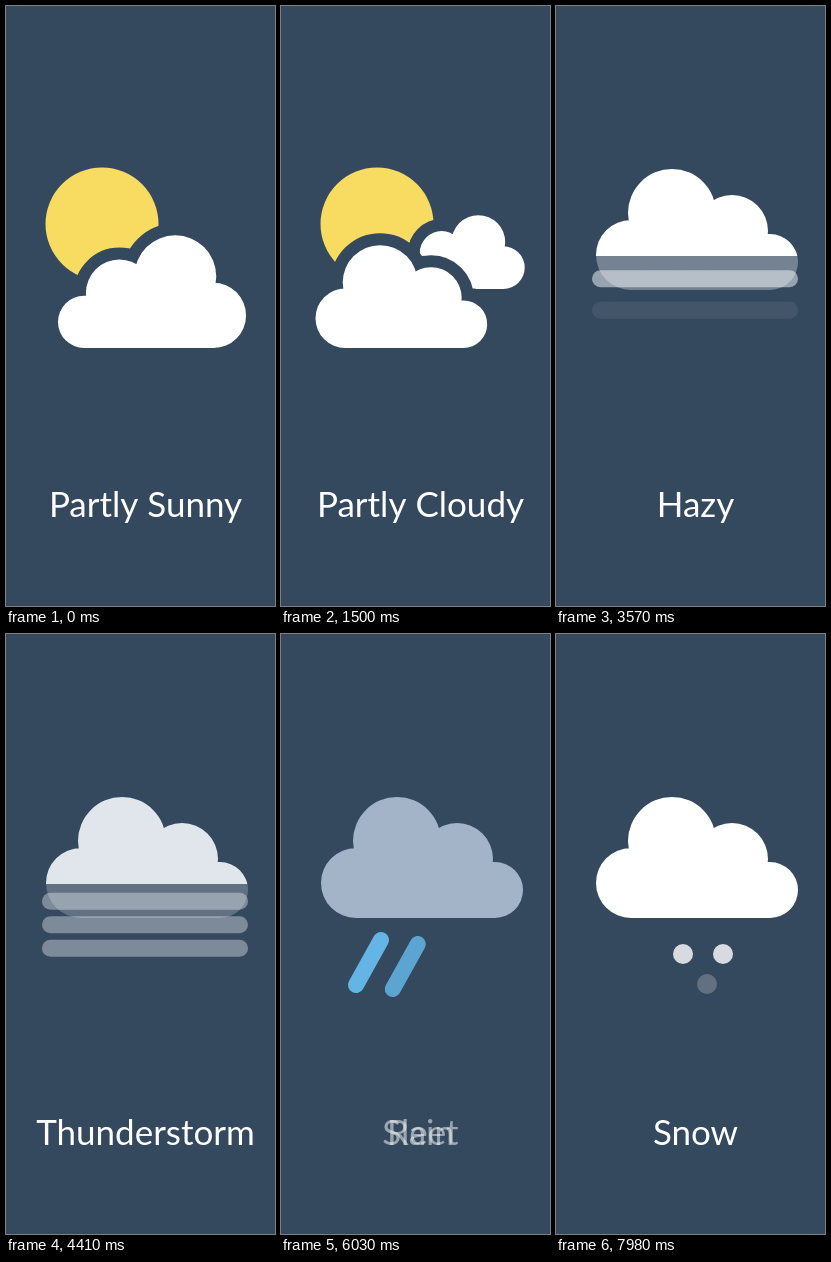
Recreate the animation shown at these times as an HTML page with a canvas. Size 269 by 600 pixels, loop 8000 ms.

```html
<!DOCTYPE html>
<html lang="en">
<head>
<meta charset="utf-8">
<title>Weather</title>
<style>
html, body { margin: 0; width: 100%; height: 100%; overflow: hidden; background: #34495e; }
canvas { display: block; }
</style>
</head>
<body>
<canvas id="stage" width="269" height="600"></canvas>
<script>
const ctx = document.getElementById('stage').getContext('2d');
const LOOP = 8000, BG = '#34495e', SUN = '#f8db61', RAIN = '#64b5e6', ICE = '#bfe3f7';
const MID = 139.5, BASE = 510.5, FADE = 200;

const linear = p => p;
const inOut = p => p < .5 ? 4 * p ** 3 : 1 - (2 - 2 * p) ** 3 / 2;
const outBack = p => 1 + 2.7 * (p - 1) ** 3 + 1.7 * (p - 1) ** 2;
const ramp = (t, a, b, ease = linear) => ease(Math.min(1, Math.max(0, (t - a) / (b - a))));
const mix = (a, b, p) => a.map((v, i) => v + (b[i] - v) * p);

// Runs a value through moves of the form [begin, end, ease, value].
const track = (t, value, moves) =>
  moves.reduce((v, [a, b, ease, to]) => mix(v, to, ramp(t, a, b, ease)), value);

// Lobes of a 202 x 121 cloud: x, y above the base, radius.
const LOBES = [[35, 35, 35], [76, 77, 44], [136, 59, 36], [174, 28, 28]];

function cloud([left, base, size], color, flip, alpha = 1) {
  ctx.save();
  ctx.translate(flip ? left + 202 * size : left, base);
  ctx.scale(flip ? -size : size, size);
  ctx.beginPath();
  for (const [x, y, r] of LOBES) {
    ctx.moveTo(x + r, -y);
    ctx.arc(x, -y, r, 0, 7);
  }
  ctx.rect(35, -56, 139, 56);
  ctx.strokeStyle = BG;
  ctx.lineWidth = 24 / size;
  ctx.stroke();
  ctx.globalAlpha = alpha;
  ctx.fillStyle = color;
  ctx.fill();
  ctx.restore();
}

function dot(x, y, r, color, alpha = 1) {
  ctx.globalAlpha = alpha;
  ctx.fillStyle = color;
  ctx.beginPath();
  ctx.arc(x, y, r, 0, 7);
  ctx.fill();
}

function capsule(x1, y1, x2, y2, width, color, alpha) {
  ctx.globalAlpha = alpha;
  ctx.strokeStyle = color;
  ctx.lineWidth = width;
  ctx.lineCap = 'round';
  ctx.beginPath();
  ctx.moveTo(x1, y1);
  ctx.lineTo(x2, y2);
  ctx.stroke();
}

function clipRows(top, bottom, paint) {
  ctx.save();
  ctx.beginPath();
  ctx.rect(0, top, 269, bottom - top);
  ctx.clip();
  paint();
  ctx.restore();
}

function sky(t) {
  const sink = ramp(t, 2280, 2850, inOut);
  const back = track(t, [52, 342, .931], [
    [630, 1170, outBack, [120.5, 283, .61]],
    [1500, 1830, inOut, [89, 274, .768]],
    [2490, 2850, outBack, [92, 263, .88]],
    [3120, 3420, inOut, [80, 284, .6]]]);
  const front = track(t, [-200, 342, .85], [
    [690, 1230, outBack, [34.5, 342, .85]],
    [1500, 1830, inOut, [35, 342, .911]],
    [2490, 2850, outBack, [34, 342, .96]],
    [3120, 3420, inOut, [40, 284, 1]]]);

  if (t < 2850) {
    dot(96 + 55 * sink, 218 + 50 * sink, 56.5, SUN);
    ctx.globalAlpha = 1;
    if (sink) cloud([back[0] - 14 * Math.min(1, sink * 5), back[1] - 2, back[2]], BG, true);
  }
  ctx.globalAlpha = 1;
  if (t < 3420) cloud(back, '#fff', true);

  const gray = ramp(t, 4200, 4830) - ramp(t, 7440, 7900);
  const color = `rgb(${mix([255, 255, 255], [164, 180, 200], gray)})`;
  const low = 1 - ramp(t, 3420, 3640) + ramp(t, 4350, 4590);
  if (low >= 1) cloud(front, color);
  else {
    clipRows(0, 250, () => cloud(front, color));
    clipRows(250, 300, () => cloud(front, color, false, low));
  }
}

function haze(t) {
  const out = ramp(t, 4200, 4560);
  for (let i = 0; i < 3; i++) {
    const p = ramp(t, 3450 + i * 105, 3660 + i * 105);
    const y = 266 + 23.5 * i + 16 * (1 - p) + 2 * out;
    capsule(44.5, y, 233.5, y, 17, '#f4f7fb', .9 * p * (1 - out));
  }
}

function bolt(t) {
  const p = ramp(t, 4560, 4830, inOut), out = ramp(t, 5070, 5270);
  ctx.globalAlpha = p * (1 - out);
  ctx.fillStyle = SUN;
  clipRows(296, 296 + 90 * p, () => {
    ctx.beginPath();
    [[134, 297], [164, 297], [150, 327], [170, 327], [124, 382], [136, 343], [115, 343]]
      .forEach(([x, y]) => ctx.lineTo(x, y));
    ctx.fill();
  });
}

// One slanted streak that grows from its top and slides away.
function streak(x, length, grow, fall, paint) {
  if (!grow || fall >= 1) return;
  ctx.save();
  ctx.translate(x - 16 * fall, 306 + 29 * fall);
  paint(-25 * length * grow, 45 * length * grow, Math.min(1, grow * 2) * (1 - fall));
  ctx.restore();
}

function rain(t) {
  for (let i = 0; i < 3; i++) {
    const x = 100 + 39 * i, k = 2 - i;
    const start = 5250 + 170 * i, end = 5880 + 130 * k;
    streak(x, 1, ramp(t, start, start + 260, inOut), ramp(t, end, end + 150),
      (dx, dy, a) => capsule(0, 0, dx, dy, 16, RAIN, a));

    const wet = 6140 + 60 * k, dry = 6630 + 110 * k;
    streak(x, .5, ramp(t, wet, wet + 220, inOut), ramp(t, dry, dry + 150),
      (dx, dy, a) => {
        capsule(0, 0, dx, dy, 16, RAIN, a);
        dot(dx * 2, dy * 2, 9, '#fff', a);
      });
  }
}

function hail(t) {
  for (let i = 0; i < 6; i++) {
    const row = i > 2 ? 1 : 0, col = i % 3;
    const p = ramp(t, 6940 + 50 * i, 7160 + 50 * i, inOut);
    const out = ramp(t, 7440 + 30 * i, 7600 + 30 * i);
    dot(100 + 39 * col - 20 * row - 8 * out, 311 + 36 * row + 15 * out, 9, ICE, p * (1 - out));
  }
}

function snow(t) {
  for (const [x, y, start] of [[127, 320, 7812], [167, 320, 7812], [151, 350, 7934]])
    dot(x, y, 10, '#fff', ramp(t, start, start + 210));
}

const width = s => ctx.measureText(s).width;
const first = phrase => [MID - width(phrase) / 2];
const last = (phrase, word) => [MID + width(phrase) / 2 - width(word)];

function word(s, [x], alpha) {
  ctx.globalAlpha = alpha;
  ctx.fillText(s, x, BASE);
}

const LABELS = [['Hazy', 3150], ['Thunderstorm', 4200], ['Rain', 5070],
  ['Sleet', 5930], ['Hail', 6630], ['Snow', 7440]];

function labels(t) {
  ctx.font = '35px Lato, "Open Sans", sans-serif';
  ctx.fillStyle = '#fff';
  const sunny = 'Partly Sunny', partly = 'Partly Cloudy', mostly = 'Mostly Cloudy';
  const cloudy = ramp(t, 630, 1000), more = ramp(t, 1500, 1800);

  word('Partly', mix(first(sunny), first(partly), ramp(t, 630, 1000, inOut)), 1 - more);
  word('Sunny', last(sunny, 'Sunny'), 1 - cloudy);
  word('Mostly', first(mostly), more * (1 - ramp(t, 2280, 2850)));
  word('Cloudy', track(t, last(partly, 'Cloudy'), [
    [1500, 1830, inOut, last(mostly, 'Cloudy')],
    [2280, 2850, inOut, first('Cloudy')]]), cloudy * (1 - ramp(t, 3150, 3150 + FADE)));

  LABELS.forEach(([s, start], i) => {
    const end = i + 1 < LABELS.length ? LABELS[i + 1][1] : LOOP;
    word(s, first(s), ramp(t, start, start + FADE) * (1 - ramp(t, end, end + FADE)));
  });
}

function draw() {
  const t = performance.now() % LOOP;
  ctx.globalAlpha = 1;
  ctx.fillStyle = BG;
  ctx.fillRect(0, 0, 269, 600);
  for (const part of [sky, haze, bolt, rain, hail, snow, labels]) part(t);
  requestAnimationFrame(draw);
}
draw();
</script>
</body>
</html>
```
